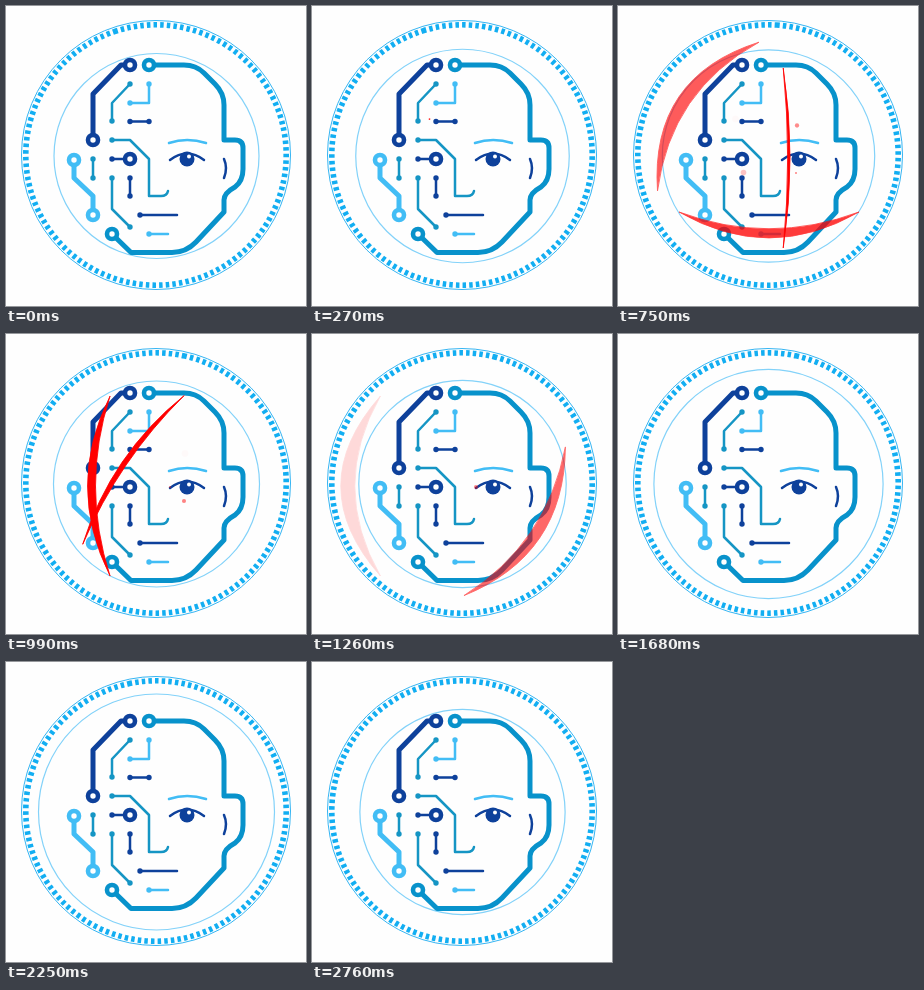
An HTML page that plays this animation: 300x300 px, repeating every 2790 ms.

```html
<!DOCTYPE html>
<html lang="en">
<head>
<meta charset="utf-8">
<title>Face scan</title>
<style>
html, body { margin: 0; width: 100%; height: 100%; overflow: hidden; background: #fefefe; }
svg { display: block; width: 100vw; height: 100vh; }
.navy { --c: #0e419b; }
.blue { --c: #0892cb; }
.teal { --c: #1595c4; }
.sky { --c: #42bdf5; }
#face path { fill: none; stroke: var(--c); stroke-width: 2.5; stroke-linejoin: round; stroke-linecap: round; }
#face .thick { stroke-width: 5; stroke-linecap: butt; }
.dot { fill: var(--c); }
.ring { fill: #fff; stroke: var(--c); stroke-width: 4.6; }
#scan { fill: #f00; }
#scan path { stroke: #f00; stroke-width: .8; }
</style>
</head>
<body>
<svg viewBox="0 0 300 300">
  <g fill="none">
    <circle cx="150" cy="149" r="134.5" stroke="#35b5f3" stroke-width="1"/>
    <circle id="ticks" cx="150" cy="149" r="130.2" stroke="#12aef2" stroke-width="5.6" stroke-dasharray="3.5 3.135"/>
    <circle id="halo" cx="150.5" cy="150" stroke="#83d2f9" stroke-width="1.2"/>
  </g>
  <g id="face">
    <path class="blue thick" d="M143 59H178Q190 59 198 67L209 78Q218 87 218 99V134H229Q237 134 237 142V163Q237 175 229 181Q218 187 218 194V206L190 236Q180 246.500 166 246.500H125L106 228"/>
    <path class="navy thick" d="M124 59H115L87 88V134"/>
    <path class="sky thick" d="M68 154V172L87 190V209"/>
    <path class="sky" d="M163 137Q181 131 200 137"/>
    <path class="navy" d="M164 154Q181 141 198 154M218 153Q222 162 218 172"/>
    <circle class="navy dot" cx="181" cy="153" r="7.500"/>
    <circle cx="183" cy="150.500" r="2" fill="#fff"/>
  </g>
  <g id="scan"></g>
</svg>
<script>
const LOOP = 2790, STEP = 30;
const $ = id => document.getElementById(id);

function add(parent, tag, attrs) {
  const el = document.createElementNS('http://www.w3.org/2000/svg', tag);
  set(el, attrs);
  return parent.appendChild(el);
}
function set(el, attrs) {
  for (const k in attrs) el.setAttribute(k, attrs[k]);
}

// Circuit traces: colour, path, dot centres
const traces = [
  ['teal', 'M124 78L106 97V115', [124, 78], [106, 115]],
  ['sky', 'M143 78V97H124', [143, 78], [124, 97]],
  ['navy', 'M124 115.5H143', [124, 115.5], [143, 115.5]],
  ['teal', 'M106 134H124L143 153V190H155Q161 190 162 185', [106, 134]],
  ['navy', 'M106 153H124', [106, 153]],
  ['teal', 'M87 153V172', [87, 153], [87, 172]],
  ['teal', 'M106 172V203L124 221', [106, 172], [124, 221]],
  ['navy', 'M124 172V190', [124, 172], [124, 190]],
  ['navy', 'M134 209H171', [134, 209]],
  ['sky', 'M143 228H162', [143, 228]]
];
for (const [color, d, ...dots] of traces) {
  add($('face'), 'path', { class: color, d });
  for (const [cx, cy] of dots) add($('face'), 'circle', { class: color + ' dot', cx, cy, r: 2.7 });
}
const rings = [
  ['navy', 124, 59], ['navy', 87, 134], ['navy', 124, 153], ['blue', 143, 59],
  ['blue', 106, 228], ['sky', 68, 154], ['sky', 87, 209]
];
for (const [color, cx, cy] of rings) add($('face'), 'circle', { class: color + ' ring', cx, cy, r: 5 });

// Crescents sweeping across the head like arcs turning in depth
const sweeps = [
  { angle: 90, from: -83, start: 306, span: 612, power: 1 },
  { angle: 0, from: 83, start: 316, span: 975, power: 1 },
  { angle: 34.3, from: -83, start: 370, span: 1020, power: 1.9 }
];
for (const s of sweeps) s.el = add($('scan'), 'path', { transform: `translate(151 152) rotate(${s.angle})` });

// Points that flash up, grow and fade: x, y, start
const sparks = [[117.5, 113, 200], [125.5, 166.5, 320], [179, 119.5, 440], [178, 167, 700], [164, 153, 960]]
  .map(([cx, cy, start]) => ({ start, el: add($('scan'), 'circle', { cx, cy }) }));

const cosine = u => (1 - Math.cos(Math.PI * u)) / 2;
const cubic = u => u < .5 ? 4 * u ** 3 : 1 - 4 * (1 - u) ** 3;

function track(keys, t, ease) {
  const i = keys.findIndex(k => k[0] > t);
  const [t0, a] = keys[i - 1], [t1, b] = keys[i];
  return a + (b - a) * ease((t - t0) / (t1 - t0));
}

const radius = [[0, 102.5], [450, 109], [1110, 102.5], [1950, 118.3], [2250, 118], [LOOP, 102.5]];
const turn = [[0, -18.6], [1320, 14.2], [LOOP, -18.6]];

function draw(t) {
  set($('halo'), { r: track(radius, t, cosine) });
  set($('ticks'), { transform: `rotate(${track(turn, t, cubic) - 90} 150 149)` });

  for (const s of sweeps) {
    const u = Math.min(1, Math.max(0, (t - s.start) / s.span)) ** s.power;
    const left = Math.max(0, s.start + s.span - t);
    const d = s.from * Math.cos(Math.PI * u);
    set(s.el, {
      d: `M${d} -90Q${1.96 * d} 0 ${d} 90Q${1.62 * d} 0 ${d} -90Z`,
      opacity: Math.min(1, u / .24, left / 220)
    });
  }
  for (const s of sparks) {
    const u = (t - s.start) / 560;
    const on = u >= 0 && u < 1;
    set(s.el, { r: on ? .5 + 3 * u : 0, opacity: on ? 1 - u : 0 });
  }
}

let begin;
function frame(now) {
  begin ??= now;
  draw(Math.floor((now - begin) % LOOP / STEP) * STEP);
  requestAnimationFrame(frame);
}
draw(0);
requestAnimationFrame(frame);
</script>
</body>
</html>
```
